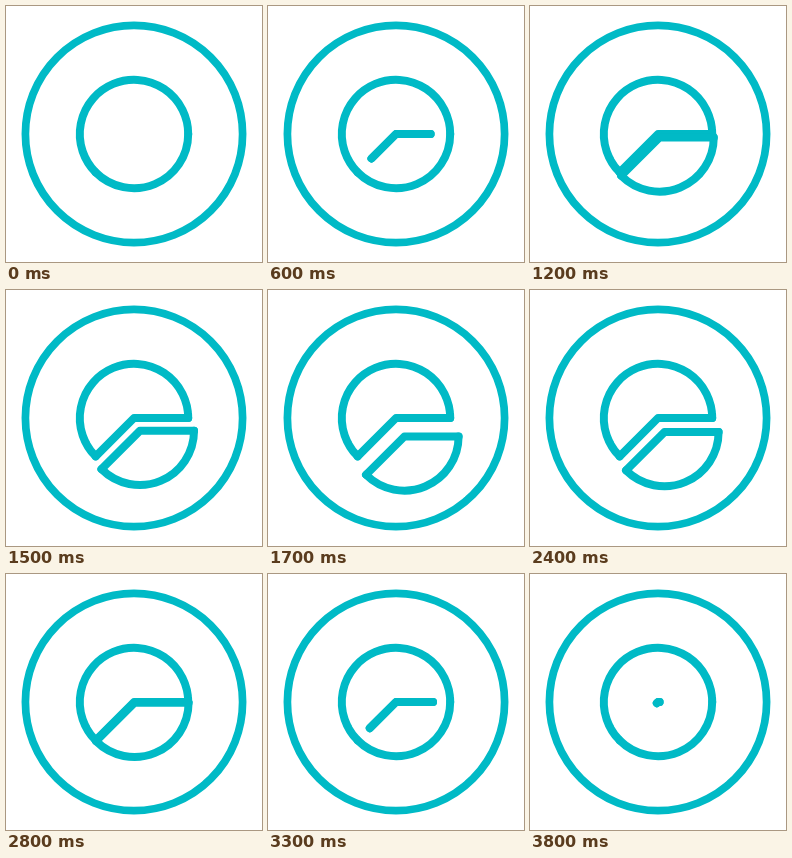
These frames come from a looping animation (256x256 px, 3900 ms). An HTML page:

```html
<!DOCTYPE html>
<html lang="en">
<head>
<meta charset="utf-8">
<title>Pie slice</title>
<style>
  html, body { margin: 0; width: 100%; height: 100%; overflow: hidden; background: #fff; }
  svg { display: block; width: 100%; height: 100%; }
  svg * { fill: none; stroke: #00bac6; stroke-width: 8; stroke-linecap: round; stroke-linejoin: round; }
</style>
</head>
<body>
<svg viewBox="0 0 256 256">
  <circle cx="128" cy="128" r="108.6" style="stroke-width:7.7"/>
  <path id="bodyArc"/>
  <path class="hands"/>
  <g id="slice">
    <path id="sliceArc"/>
    <path class="hands"/>
  </g>
</svg>
<script>
const LOOP = 3900, STEP = 100;
const CENTER = 128, RADIUS = 54.2;
const SHIFT = { x: 9.4, y: 20.7 };

// Each pair of times (ms) bounds an eased move from 0 to 1 or back.
const HANDS = { grow: [190, 880], shrink: [2940, 3900] };
const SLICE = { grow: [960, 1890], shrink: [2100, 2895] };

const hands = document.querySelectorAll('.hands');
const slice = document.getElementById('slice');

const ease = (t, [start, end]) => {
  const u = Math.min(1, Math.max(0, (t - start) / (end - start)));
  return u * u * (3 - 2 * u);
};
const amount = (t, { grow, shrink }) => ease(t, grow) - ease(t, shrink);

const point = (degrees, length = RADIUS) => {
  const a = degrees * Math.PI / 180;
  return `${CENTER + length * Math.cos(a)} ${CENTER + length * Math.sin(a)}`;
};
const arc = (from, to) =>
  `M${point(from)} A${RADIUS} ${RADIUS} 0 ${to - from > 180 ? 1 : 0} 1 ${point(to)}`;

document.getElementById('bodyArc').setAttribute('d', arc(135, 360));
document.getElementById('sliceArc').setAttribute('d', arc(0, 135));

function draw(now) {
  const t = Math.floor((now % LOOP) / STEP) * STEP;
  const length = RADIUS * amount(t, HANDS);
  const path = length > 0
    ? `M${point(0, length)} L${CENTER} ${CENTER} L${point(135, length)}`
    : '';
  hands.forEach(hand => hand.setAttribute('d', path));

  const out = amount(t, SLICE);
  slice.setAttribute('transform', `translate(${SHIFT.x * out} ${SHIFT.y * out})`);
}

const origin = performance.now();
function tick() {
  draw(performance.now() - origin);
  requestAnimationFrame(tick);
}
tick();
</script>
</body>
</html>
```
